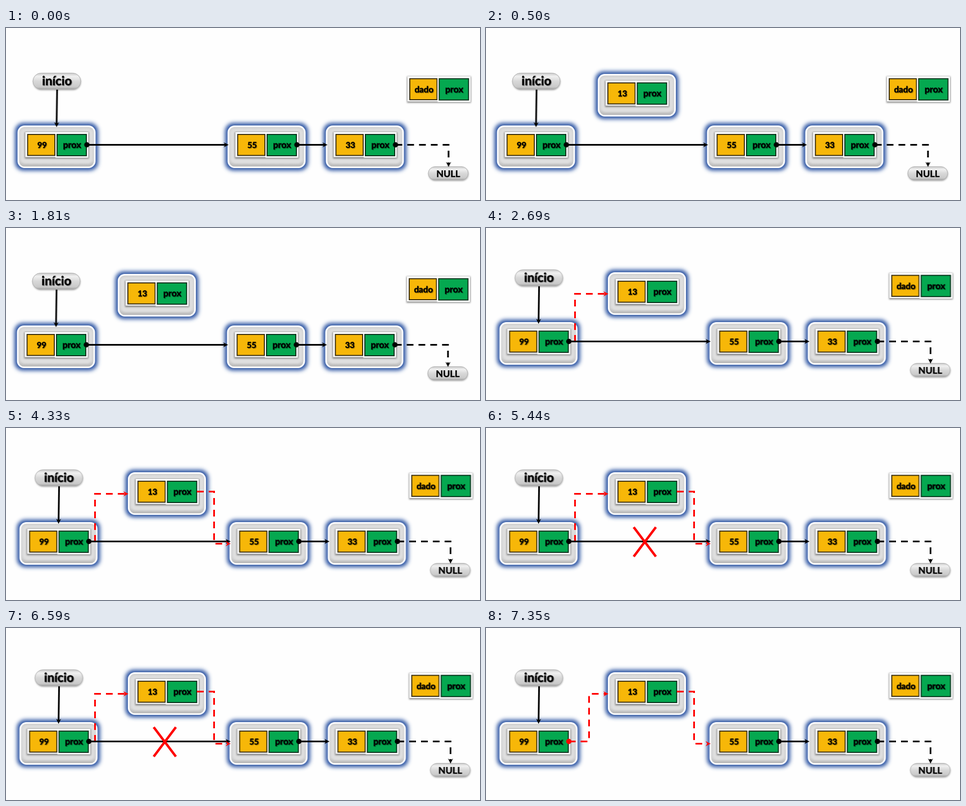
These frames come from a looping animation (844 px wide and 307 px high, 8 s). An HTML page:

```html
<!DOCTYPE html>
<html lang="pt">
<head>
<meta charset="utf-8">
<title>Lista encadeada</title>
<style>
html, body { margin: 0; width: 100%; height: 100%; overflow: hidden; background: #fefefe; }
svg { display: block; width: 100%; height: 100%; }
text {
  font: 700 14.6px Lato, Carlito, sans-serif;
  text-anchor: middle;
  text-rendering: geometricPrecision;
  text-shadow: 1px 1px 1px rgba(0, 0, 0, .4);
  stroke: #000;
  stroke-width: .45;
}
.prox { font-size: 16px; }
.data { font-size: 15.2px; }
.start { font-size: 22.2px; }
.null { font-size: 16.4px; text-shadow: none; }
.line { fill: none; stroke: #000; stroke-width: 3; marker-end: url(#tip); }
.dash { stroke-dasharray: 12 9; }
.red { stroke: #f00; marker-end: url(#redTip); }
.cross { fill: none; stroke: #f00; stroke-width: 4.4; }

.stage, .new, .insert, .link, .old, .cut, .final { animation: 8s step-end infinite; }
.stage { animation-name: stage; }
.new { animation-name: new; }
.insert { animation-name: insert; }
.link { animation-name: link; }
.old { animation-name: old; }
.cut { animation-name: cut; }
.final { animation-name: final; }

@keyframes stage {
  0% { transform: translate(-3.5px, 6px); }
  6.25% { transform: translate(-4.5px, 6px); }
  33.625%, 100% { transform: none; }
}
@keyframes new {
  0% { opacity: 0; transform: translate(-13.5px, -3px); }
  6.25% { opacity: 1; transform: translate(-13.5px, -3px); }
  33.625%, 100% { opacity: 1; transform: none; }
}
@keyframes insert { 0% { opacity: 0; } 33.625% { opacity: 1; } 91.875%, 100% { opacity: 0; } }
@keyframes link { 0% { opacity: 0; } 54.125%, 100% { opacity: 1; } }
@keyframes old { 0% { opacity: 1; } 91.875%, 100% { opacity: 0; } }
@keyframes cut { 0% { opacity: 0; } 68% { opacity: 1; } 91.875%, 100% { opacity: 0; } }
@keyframes final { 0% { opacity: 0; } 91.875%, 100% { opacity: 1; } }
</style>
</head>
<body>
<svg viewBox="0 0 844 307" preserveAspectRatio="none">
  <defs>
    <linearGradient id="panel" x2="0" y2="1">
      <stop offset="0" stop-color="#cecece"/>
      <stop offset=".12" stop-color="#d8d8d8"/>
      <stop offset=".85" stop-color="#d2d2d2"/>
      <stop offset="1" stop-color="#b4b4b4"/>
    </linearGradient>
    <linearGradient id="pill" x2="0" y2="1">
      <stop offset="0" stop-color="#c9c9c9"/>
      <stop offset=".2" stop-color="#f0f0f0"/>
      <stop offset=".5" stop-color="#d8d8d8"/>
      <stop offset=".85" stop-color="#cacaca"/>
      <stop offset="1" stop-color="#a0a0a0"/>
    </linearGradient>
    <filter id="glow" x="-20%" y="-30%" width="140%" height="160%"><feGaussianBlur stdDeviation="3.6"/></filter>
    <filter id="soft" x="-20%" y="-30%" width="140%" height="160%"><feGaussianBlur stdDeviation="1.7"/></filter>
    <marker id="tip" markerUnits="userSpaceOnUse" markerWidth="9" markerHeight="9" refX="6" refY="4.5" orient="auto">
      <path d="M0 0L9 4.5L0 9L3 4.5z"/>
    </marker>
    <marker id="redTip" markerUnits="userSpaceOnUse" markerWidth="9" markerHeight="9" refX="6" refY="4.5" orient="auto">
      <path d="M0 0L9 4.5L0 9L3 4.5z" fill="#f00"/>
    </marker>

    <!-- Data and pointer cells, origin at the node's corner -->
    <g id="cells">
      <rect x="13" y="12" width="114" height="47" fill="#000" opacity=".42" filter="url(#soft)"/>
      <rect x="14" y="12" width="56" height="44.5" fill="#fff"/>
      <rect x="18" y="16" width="48.5" height="37.5" fill="#f7b708" stroke="#33280a" stroke-width="1.8"/>
      <rect x="67.5" y="12" width="58.5" height="45.5" fill="#fff"/>
      <rect x="70.4" y="16" width="52.2" height="38" fill="#05a850" stroke="#062d18" stroke-width="1.8"/>
      <text class="prox" x="97" y="40.3">prox</text>
    </g>
    <g id="node">
      <rect x="-4.5" y="-4.5" width="148" height="85" rx="15" fill="#2b52a2" filter="url(#glow)"/>
      <rect x="1.4" y="1.4" width="136.2" height="73.2" rx="11" fill="url(#panel)" stroke="#fff" stroke-width="2.8"/>
      <rect x="6" y="6" width="127" height="62" rx="8" fill="#dfdfdf" filter="url(#soft)"/>
      <use href="#cells"/>
    </g>
    <circle id="dot" r="4.7"/>
  </defs>

  <g class="stage">
    <rect x="52" y="76" width="85" height="29" rx="14.5" fill="#000" opacity=".35" filter="url(#soft)"/>
    <rect x="51.5" y="74.5" width="85" height="29" rx="14.5" fill="url(#pill)" stroke="#b0b0b0"/>
    <text class="start" x="94.2" y="96.2">início</text>
    <rect x="756" y="243" width="71" height="24" rx="12" fill="#000" opacity=".35" filter="url(#soft)"/>
    <rect x="755.5" y="241.5" width="71" height="24" rx="12" fill="url(#pill)" stroke="#b0b0b0"/>
    <text class="null" x="791" y="259.7">NULL</text>

    <g transform="translate(704.5 68.5)">
      <use href="#cells"/>
      <text class="data" x="43.3" y="40.3">dado</text>
    </g>
    <g transform="translate(24 168)">
      <use href="#node"/>
      <text x="43.8" y="39.5">99</text>
    </g>
    <g transform="translate(398 168)">
      <use href="#node"/>
      <text x="43.8" y="39.5">55</text>
    </g>
    <g transform="translate(573 168)">
      <use href="#node"/>
      <text x="43.8" y="39.5">33</text>
    </g>
    <g class="new">
      <g transform="translate(217 79)">
        <use href="#node"/>
        <text x="43.8" y="39.5">13</text>
      </g>
    </g>

    <path class="line" d="M94.5 104L93.6 168"/>
    <path class="line dash red insert" d="M158.5 203V117.5H215"/>
    <g class="old">
      <use href="#dot" x="147.5" y="202.5"/>
      <path class="line" d="M147.5 202.5H397"/>
    </g>
    <use href="#dot" x="521.5" y="202.5"/>
    <path class="line" d="M521.5 202.5H573"/>
    <use href="#dot" x="697" y="202.5"/>
    <path class="line dash" d="M697 202.5H791.5V239"/>

    <path class="line dash red link" d="M340 113.5H370.5V206.5H397"/>
    <path class="cross cut" d="M263 177L302.5 229.5M302.5 177L263 229.5"/>
    <g class="final">
      <use href="#dot" x="147.5" y="202.5" fill="#f00"/>
      <path class="line dash red" d="M147.5 202.5H183.5V117.5H215"/>
    </g>
  </g>
</svg>
</body>
</html>
```
